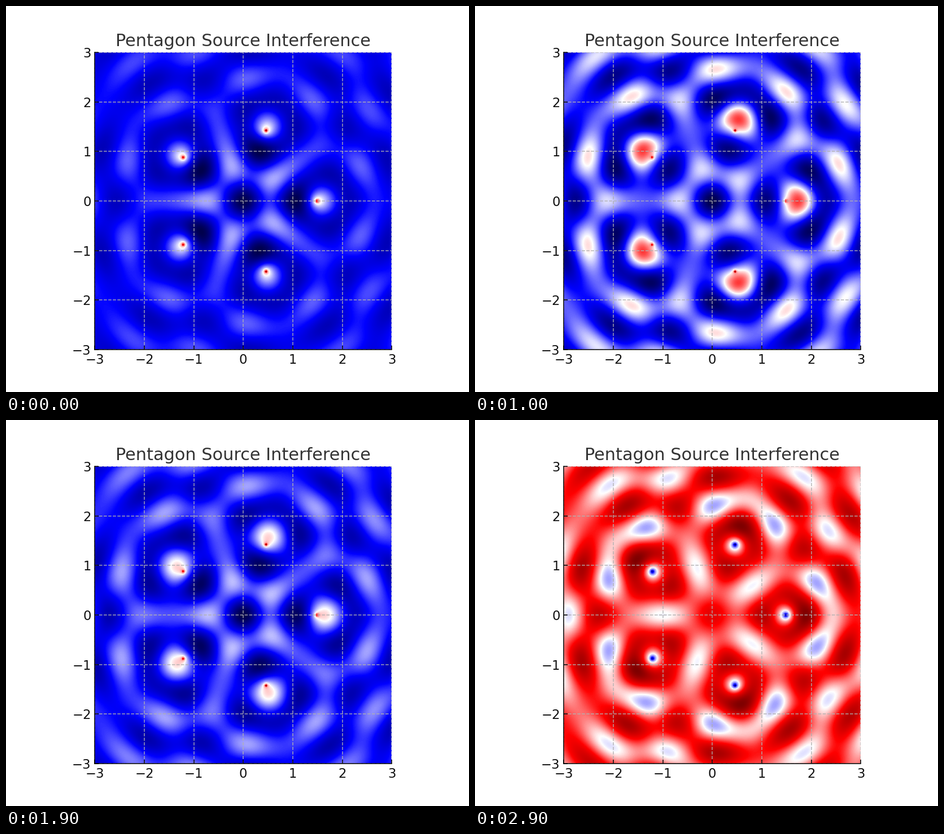
A matplotlib script for the animation above (3000 ms loop, 820 by 683 pixels).

```python
import numpy as np
import matplotlib.pyplot as plt
from matplotlib.animation import FuncAnimation

FRAMES, INTERVAL = 30, 100
WIDTH, HEIGHT, DPI = 820, 683, 64
SCALE = WIDTH / 6 / DPI    # a layout six inches wide enlarged to the stage
WAVELENGTH, RADIUS, LIMIT, POINTS = 1.0, 1.5, 3, 200

# Sum the five circular waves once as a complex field; time only turns its phase.
axis = np.linspace(-LIMIT, LIMIT, POINTS)
x, y = np.meshgrid(axis, axis)
k = 2 * np.pi / WAVELENGTH
field = np.zeros_like(x, dtype=complex)
for angle in 2 * np.pi * np.arange(5) / 5:
    r = np.hypot(x - RADIUS * np.cos(angle), y - RADIUS * np.sin(angle))
    field += np.exp(1j * k * r) / np.sqrt(r + 1e-6)

times = np.linspace(0, 2 * np.pi, FRAMES)


def wave(frame):
    return (field * np.exp(-2j * np.pi * times[frame])).real


plt.rcParams["font.family"] = "DejaVu Sans"
fig, ax = plt.subplots(figsize=(WIDTH / DPI, HEIGHT / DPI), dpi=DPI,
                       facecolor="white")
fig.subplots_adjust(left=0.125, right=0.9, bottom=0.11, top=0.88)

image = ax.imshow(wave(0), cmap="seismic", origin="lower",
                  extent=(-LIMIT, LIMIT, -LIMIT, LIMIT))

ax.set_title("Pentagon Source Interference", fontsize=16 * SCALE,
             pad=6 * SCALE, color="#333333")
ticks = range(-LIMIT, LIMIT + 1)
ax.set_xticks(ticks)
ax.set_yticks(ticks)
ax.tick_params(direction="in", length=3.5 * SCALE, width=0.8 * SCALE,
               pad=3.5 * SCALE, labelsize=12 * SCALE, labelcolor="#111111")
ax.grid(True, linestyle="--", linewidth=0.8 * SCALE, color="#b0b0b0", alpha=0.9)
ax.spines[["top", "right"]].set_visible(False)
ax.spines[["left", "bottom"]].set_linewidth(0.8 * SCALE)


def update(frame):
    image.set_data(wave(frame))
    image.autoscale()      # each moment spans the full colour range
    return (image,)


anim = FuncAnimation(fig, update, frames=FRAMES, interval=INTERVAL,
                     repeat=True, repeat_delay=0)
plt.show()
```
